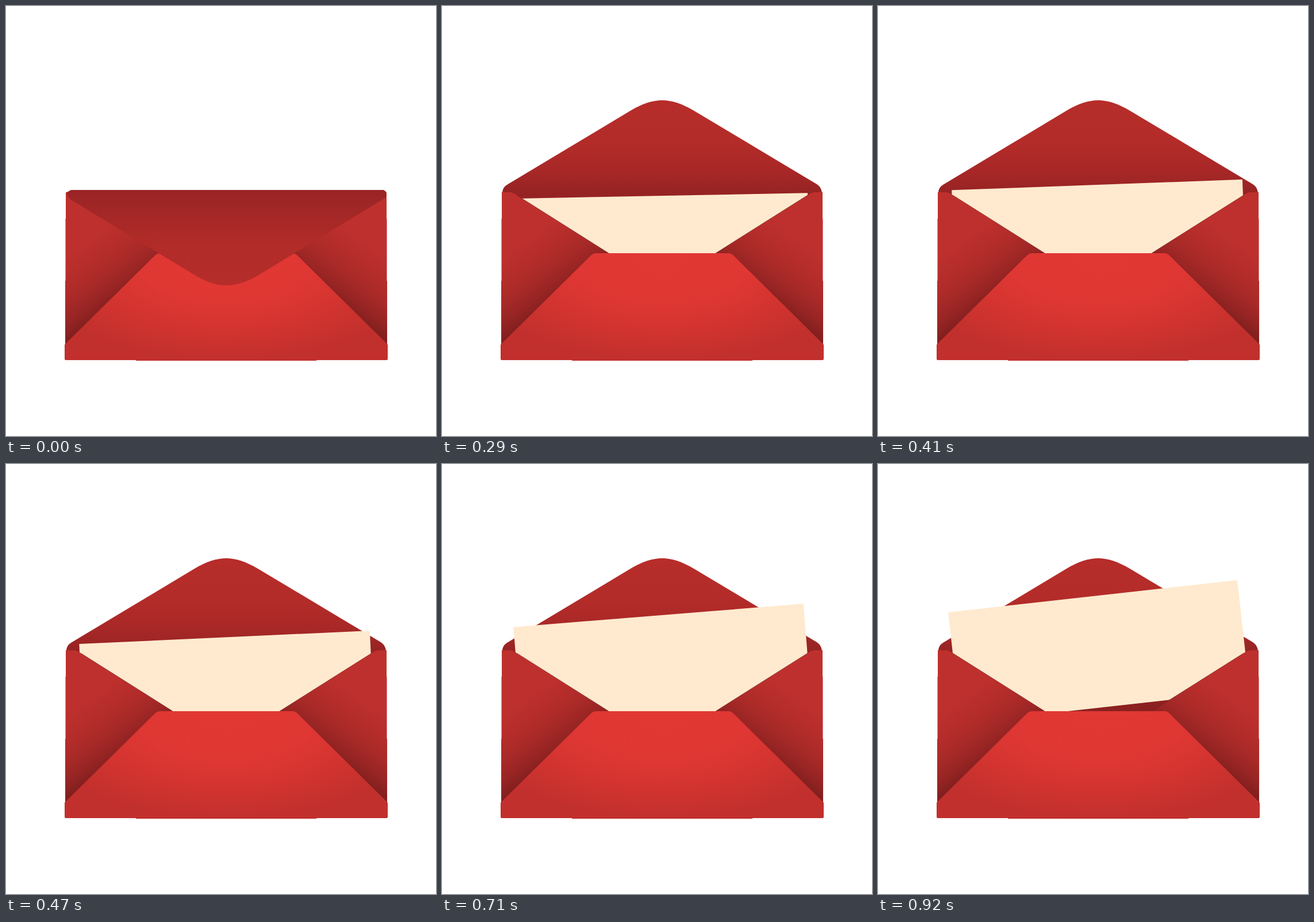
An HTML page for the animation above (1.49 s loop, 748 by 748 pixels).

```html
<!DOCTYPE html>
<html lang="en">
<head>
<meta charset="utf-8">
<title>Envelope</title>
<style>
  html, body { margin: 0; width: 100%; height: 100%; overflow: hidden; background: #fff; }
  svg { display: block; width: 100vw; height: 100vh; }
</style>
</head>
<body>
<svg viewBox="0 0 748 748">
  <defs>
    <linearGradient id="openFill" gradientUnits="userSpaceOnUse" x1="383" y1="164" x2="383" y2="434">
      <stop offset="0" stop-color="#b62d2a"/>
      <stop offset=".25" stop-color="#b42c29"/>
      <stop offset=".45" stop-color="#a82827"/>
      <stop offset=".6" stop-color="#962323"/>
      <stop offset="1" stop-color="#8a2020"/>
    </linearGradient>
    <linearGradient id="shutFill" gradientUnits="userSpaceOnUse" x1="383" y1="320" x2="383" y2="486">
      <stop offset="0" stop-color="#992424"/>
      <stop offset=".3" stop-color="#a62827"/>
      <stop offset=".6" stop-color="#b22c29"/>
      <stop offset="1" stop-color="#b62d2a"/>
    </linearGradient>
    <linearGradient id="sideFill" gradientUnits="userSpaceOnUse" x1="104" y1="585" x2="32" y2="489">
      <stop offset="0" stop-color="#801f1e"/>
      <stop offset=".22" stop-color="#982524"/>
      <stop offset=".45" stop-color="#a92a28"/>
      <stop offset=".7" stop-color="#b52d2b"/>
      <stop offset="1" stop-color="#be302d"/>
    </linearGradient>
    <radialGradient id="frontFill" gradientUnits="userSpaceOnUse" cx="0" cy="0" r="1"
      gradientTransform="translate(383 440) scale(350 175)">
      <stop offset="0" stop-color="#e23834"/>
      <stop offset=".45" stop-color="#df3733"/>
      <stop offset=".75" stop-color="#d0332f"/>
      <stop offset="1" stop-color="#c2302d"/>
    </radialGradient>
    <g id="side">
      <path fill="url(#sideFill)" d="M104 324H118Q124 324.500 130 329L290 430L300 450L104 600H103V478H103.500V370H104Z"/>
      <path fill="none" stroke="#7a1c1c" stroke-opacity=".6" d="M130 329L290 430"/>
    </g>
  </defs>

  <path id="open" fill="url(#openFill)"
    d="M105 440V325Q105 316 113 311L328 182C348 170 366 164 383 164C400 164 418 170 438 182L652 310Q660 315 661 325V440Z"/>
  <rect id="card" x="-506" width="506" height="194" fill="#ffeacf"/>
  <use href="#side"/>
  <use href="#side" transform="translate(766 0) scale(-1 1)"/>
  <path fill="url(#frontFill)"
    d="M102 589L259 434Q263 430 269 430H498Q503 430 507 434L664 589V614Q664 616 662 616H540V617H226V616H104Q102 616 102 614Z"/>
  <path id="shut" fill="url(#shutFill)"
    d="M106 324L113 320H657L661 323V333L438 469C418 480 401 486 383 486C366 486 348 480 328 468L113 337Q107 333 106 324Z"/>
</svg>
<script>
  const LOOP = 1490, OPEN_AT = 230, STEP = 30, LAST = 23;
  const [open, card, shut] = ["open", "card", "shut"].map(id => document.getElementById(id));
  const show = (el, on) => el.setAttribute("visibility", on ? "visible" : "hidden");

  // The card is placed by its top right corner, which rises while the card tilts.
  function draw(now) {
    const t = now % LOOP;
    const opened = t >= OPEN_AT;
    show(open, opened);
    show(card, opened);
    show(shut, !opened);
    const k = Math.max(0, Math.min(LAST, Math.floor((t - OPEN_AT) / STEP)));
    const x = 637 - 0.52 * k, y = 337 - 5.87 * k, tilt = 0.6 + 0.25 * k;
    card.setAttribute("transform", `translate(${x} ${y}) rotate(${-tilt})`);
  }

  const start = performance.now();
  function tick() {
    draw(performance.now() - start);
    requestAnimationFrame(tick);
  }
  tick();
</script>
</body>
</html>
```
